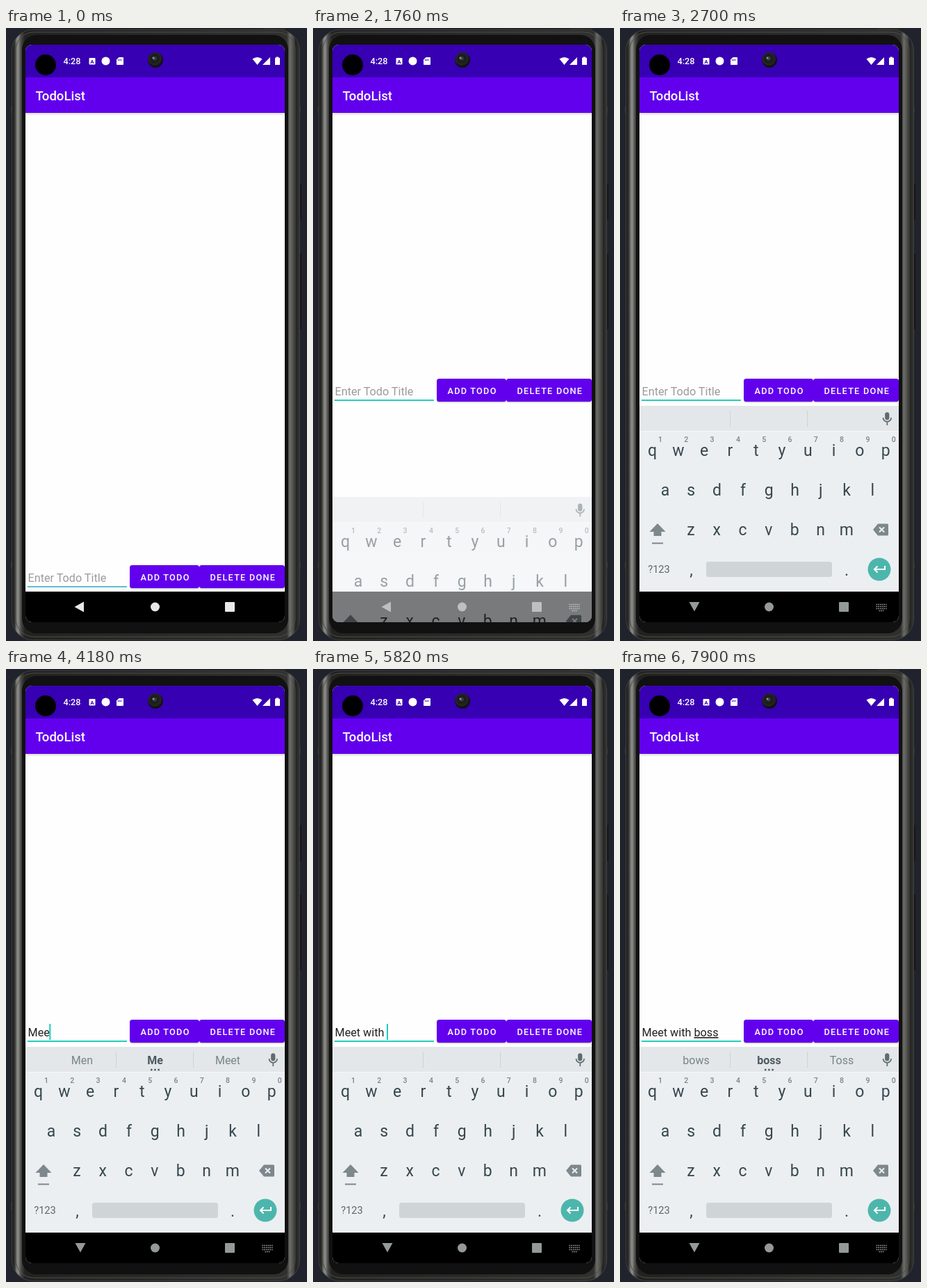
Write an HTML page that moves like this. It is 433x881 px and loops after 8000 ms.

```html
<!DOCTYPE html>
<html lang="en">
<head>
<meta charset="utf-8">
<title>TodoList</title>
<style>
  html, body { margin: 0; width: 100%; height: 100%; overflow: hidden; background: #20232c; }
  svg { display: block; width: 433px; height: 881px; font-family: Roboto, sans-serif; }
  text { white-space: pre; }
  .mid { text-anchor: middle; }
  .med { font-weight: 500; fill: #fff; }
</style>
</head>
<body>
<svg viewBox="0 0 433 881">
  <defs>
    <linearGradient id="rim">
      <stop offset="0" stop-color="#181817"/><stop offset=".01" stop-color="#333331"/>
      <stop offset=".016" stop-color="#7c7c79"/><stop offset=".022" stop-color="#8a8a87"/>
      <stop offset=".032" stop-color="#464644"/><stop offset=".045" stop-color="#222221"/>
      <stop offset=".955" stop-color="#30302f"/><stop offset=".966" stop-color="#6b6b68"/>
      <stop offset=".978" stop-color="#4d4d4a"/><stop offset=".986" stop-color="#222221"/>
      <stop offset="1" stop-color="#353533"/>
    </linearGradient>
    <radialGradient id="lens" cx=".45" cy=".4">
      <stop offset="0" stop-color="#4c504e"/><stop offset=".4" stop-color="#191b1a"/>
      <stop offset=".8" stop-color="#252626"/><stop offset="1" stop-color="#111"/>
    </radialGradient>
    <linearGradient id="fade" x2="0" y2="1">
      <stop offset="0" stop-color="#000" stop-opacity=".14"/><stop offset="1" stop-color="#000" stop-opacity="0"/>
    </linearGradient>
    <clipPath id="screen"><rect x="28" y="24" width="373" height="830" rx="9"/></clipPath>
  </defs>

  <!-- phone body -->
  <g fill="#161616">
    <rect x="420" y="224" width="5" height="52" rx="1"/>
    <rect x="420" y="324" width="5" height="109" rx="1"/>
    <path d="M370 0h32v4h-32z" fill="#2b2b29"/>
    <path d="M7 113h4v9h-4zM7 767h4v10h-4zM421 113h3v9h-3zM421 767h3v10h-3z" fill="#343432"/>
  </g>
  <rect x="8.5" y="2.5" width="414" height="877" rx="30" fill="url(#rim)" stroke="#3e3e3c"/>
  <rect x="14" y="6" width="402" height="869" rx="26" fill="none" stroke="#4c4c4a"/>
  <rect x="23" y="10" width="383" height="860" rx="21" fill="#111"/>

  <g clip-path="url(#screen)">
    <rect x="28" y="24" width="373" height="830" fill="#fefefe"/>
    <rect x="28" y="122" width="373" height="4" fill="url(#fade)"/>
    <rect x="28" y="71" width="373" height="51" fill="#6200ee"/>
    <rect x="28" y="24" width="373" height="47" fill="#3700b3"/>
    <text class="med" x="42.5" y="103.5" font-size="18.5">TodoList</text>
    <text class="med" x="82.5" y="52" font-size="12.7">4:28</text>
    <circle cx="57" cy="53" r="15"/>
    <circle cx="215" cy="46" r="11" fill="url(#lens)"/>
    <circle cx="212" cy="43" r="1.5" fill="#8d9390"/>
    <g fill="#fff">
      <rect x="119.5" y="43" width="9" height="9.5" rx="1"/>
      <circle cx="143.5" cy="47.5" r="6"/>
      <path d="M162.5 42h5.5q1 0 1 1v9q0 1-1 1h-8q-1 0-1-1v-6.5z"/>
      <path d="M354.5 44.5q7-5 14 0l-7 8.5zM369 53l11-11v11zM388.5 41.5h3.5v1.3h2v10.2h-7v-10.2h1.5z"/>
    </g>
    <path d="M161.500 45v2m2-2v2m2-2v2" stroke="#3700b3"/>
    <text class="mid" x="124" y="50.5" font-size="8" font-weight="700" fill="#3700b3">A</text>

    <!-- entry row -->
    <g id="row">
      <text id="entry" x="31.5" y="796" font-size="16.2"><tspan id="done"></tspan><tspan id="word"></tspan></text>
      <rect id="line" x="31" y="802" width="143" height="2"/>
      <rect id="caret" y="778" width="2" height="23" fill="#18cdbb"/>
      <g fill="#000" opacity=".18">
        <rect x="178" y="773.5" width="100" height="33" rx="4"/><rect x="278" y="773.5" width="123" height="33" rx="4"/>
      </g>
      <g fill="#6200ee">
        <rect x="178" y="772" width="100" height="33" rx="3.5"/><rect x="278" y="772" width="123" height="33" rx="3.5"/>
      </g>
      <g class="med" font-size="12.7" letter-spacing="1.25">
        <text x="193.5" y="793.5">ADD TODO</text><text x="293.5" y="793.5">DELETE DONE</text>
      </g>
    </g>

    <rect x="28" y="810" width="373" height="44"/>

    <!-- keyboard -->
    <g id="board">
      <rect x="28" y="543" width="373" height="267" fill="#eceff1"/>
      <rect x="28" y="543" width="373" height="36" fill="#e3e7e9"/>
      <path d="M28 579.5h373" stroke="#f5f7f8"/>
      <path d="M158.5 550v23m111-23v23" stroke="#cdd2d5"/>
      <g fill="none" stroke="#5f6b70" stroke-width="1.7">
        <rect x="382" y="553" width="4.5" height="9.5" rx="2.25" fill="#5f6b70"/>
        <path d="M378.5 560a5.8 5.8 0 0 0 11.6 0m-5.8 6v5"/>
      </g>
      <g id="tips" class="mid" font-size="16" fill="#78848a">
        <text x="109.5" y="567.5"></text>
        <text x="214.5" y="567.5" font-weight="700" fill="#4b5960"></text>
        <text x="319" y="567.5"></text>
        <path d="M208 576h2.5m2.7 0h2.5m2.7 0h2.5" stroke="#4b5960" stroke-width="2.4"/>
      </g>
      <g id="keys" class="mid" font-size="23" fill="#37474f"></g>
      <text class="mid" x="56" y="783" font-size="14.6" fill="#59666c">?123</text>
      <rect x="124" y="767" width="181" height="22" rx="3.5" fill="#cfd4d7"/>
      <g fill="#7d888d">
        <path d="M54 712l11.5 12h-6v6h-11v-6h-6zM46 739.5h16v2h-16z"/>
        <path d="M371 712.5h13.5q1.5 0 1.5 1.5v14q0 1.5-1.5 1.5h-13.5l-7-8.5z"/>
      </g>
      <path d="M373 717.5l7 7m0-7l-7 7" stroke="#eceff1" stroke-width="2"/>
      <circle cx="373" cy="778" r="16.5" fill="#4db6ac"/>
      <path d="M381 773v5h-15m4.5-4.5l-4.5 4.5l4.5 4.5" fill="none" stroke="#fff" stroke-width="2"/>
    </g>

    <!-- navigation -->
    <g id="nav" fill="currentColor">
      <path id="back" d="M98.5 832l13.5-7.5v15z"/>
      <circle cx="214.5" cy="832" r="6.5"/>
      <rect x="315" y="825" width="14" height="14" rx="1"/>
      <path id="toggle" d="M368.5 828.5h15m-15 3h15m-15 3h15m-11 3h7" fill="none" stroke="currentColor" stroke-width="1.7" stroke-dasharray="1.7 1"/>
    </g>
  </g>
</svg>
<script>
const LOOP = 8000;
const $ = id => document.getElementById(id);
const clamp = v => Math.min(1, Math.max(0, v));
const mix = (a, b, p) => `rgb(${a.map((v, i) => Math.round(v + (b[i] - v) * p))})`;

// time, finished text, word being typed, underlined
const typing = [
  [0, '', ''], [3490, '', 'M'], [3900, '', 'Me'], [4110, '', 'Mee'], [4320, '', 'Meet', 1],
  [4460, 'Meet ', ''], [4660, 'Meet ', 'w', 1], [4870, 'Meet ', 'wi', 1],
  [5080, 'Meet ', 'wit', 1], [5220, 'Meet ', 'with', 1], [5620, 'Meet with ', ''],
  [6900, 'Meet with ', 'b', 1], [7040, 'Meet with ', 'bo', 1],
  [7180, 'Meet with ', 'bos', 1], [7300, 'Meet with ', 'boss', 1]
];
const tips = [
  [0, ''], [3630, 'My,M,Make'], [4040, 'Men,Me,Meet'], [4250, 'Met,Mee,Meet'], [4390, 'Meet,Meet,Meets'],
  [4530, ''], [4800, 'we,w,was'], [5010, 'will,wi,with'], [5220, 'wit,with,without'], [5360, 'width,with,without'],
  [5820, ''], [7040, 'be,b,but'], [7180, 'box,bo,both'], [7300, 'bows,bos,boss'], [7440, 'bows,boss,Toss']
];
const caretOff = [[0, 160], [740, 1220], [1720, 2240], [2700, 3230], [6170, 6630], [7900, LOOP]];

const at = (list, t) => list.findLast(e => e[0] <= t);

// cubic-bezier(.4, 0, .2, 1)
function ease(p) {
  let lo = 0, hi = 1, s;
  for (let i = 0; i < 24; i++) {
    s = (lo + hi) / 2;
    const r = 1 - s;
    if (1.2 * s * r * r + 0.6 * s * s * r + s ** 3 < p) lo = s; else hi = s;
  }
  return s * s * (3 - 2 * s);
}
const span = (t, start, length) => {
  const p = clamp((t - start) / length);
  return p === 0 || p === 1 ? p : ease(p);
};

function buildKeys() {
  const rows = [['qwertyuiop', 46.5, 615], ['asdfghjkl', 65, 672], ['zxcvbnm', 102, 729]];
  let out = '<text x="102.5" y="787">,</text><text x="326" y="787">.</text>';
  for (const [letters, x, y] of rows)
    [...letters].forEach((c, i) => { out += `<text x="${x + 37.3 * i}" y="${y}">${c}</text>`; });
  for (let i = 0; i < 10; i++)
    out += `<text x="${58 + 37.3 * i}" y="595" font-size="10.5" font-weight="500" fill="#78848a">${(i + 1) % 10}</text>`;
  $('keys').innerHTML = out;
}

function draw(t) {
  const [, done, word, underlined] = at(typing, t);
  const empty = !done && !word;
  $('done').textContent = empty ? 'Enter Todo Title' : done;
  $('word').textContent = word;
  $('word').setAttribute('text-decoration', underlined ? 'underline' : 'none');
  $('entry').setAttribute('fill', empty ? '#9b9b9b' : '#212121');
  $('caret').setAttribute('x', empty ? 31 : 31 + $('entry').getComputedTextLength());
  $('caret').style.display = caretOff.some(([a, b]) => t >= a && t < b) ? 'none' : '';
  $('line').setAttribute('fill', mix([91, 190, 208], [32, 207, 190], clamp(t / 250)));

  const open = t >= 1620;
  $('row').setAttribute('transform', `translate(0 ${open ? -268 : 0})`);
  $('toggle').style.display = open ? '' : 'none';

  const shown = span(t, 1655, 300);
  $('board').setAttribute('transform', `translate(0 ${267 * (1 - shown)})`);
  $('board').setAttribute('opacity', shown);
  $('nav').style.color = mix([232, 232, 232], [148, 153, 154], shown);
  $('back').setAttribute('transform', `rotate(${-90 * span(t, 1845, 260)} 106 831)`);

  const choices = at(tips, t)[1];
  $('tips').style.display = choices ? '' : 'none';
  choices.split(',').forEach((c, i) => { $('tips').children[i].textContent = c; });
}

buildKeys();
const begin = performance.now();
function tick() {
  draw((performance.now() - begin) % LOOP);
  requestAnimationFrame(tick);
}
tick();
</script>
</body>
</html>
```
